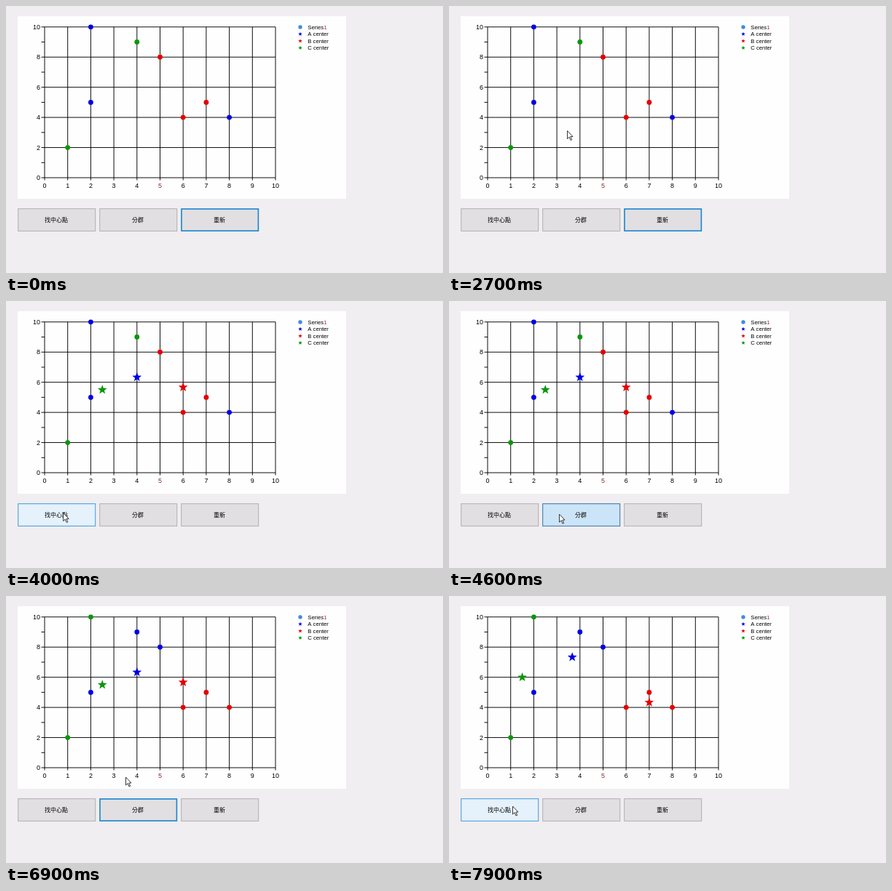
Recreate the animation shown at these times as an HTML page with a canvas. Size 600x367 px, loop 8 s.

```html
<!DOCTYPE html>
<html lang="zh-Hant">
<head>
<meta charset="utf-8">
<title>K-means</title>
<style>
html, body { margin: 0; height: 100%; overflow: hidden; background: #f0eef0; }
canvas { display: block; }
</style>
</head>
<body>
<canvas id="stage" width="600" height="367"></canvas>
<script>
const ctx = document.getElementById('stage').getContext('2d');
const LOOP = 8000, STEP = 100;
const A = '#0000e6', B = '#e60000', C = '#0a960a', BLACK = '#000';
const SANS = '"Liberation Sans", Arial, sans-serif';
const CJK = '500 8px "Noto Sans CJK TC", "Noto Sans CJK", sans-serif';

const points = [[2, 10], [2, 5], [8, 4], [5, 8], [7, 5], [6, 4], [1, 2], [4, 9]];

// Timelines: [start time, value], each held until the next entry
const clusters = [
  [0, [A, A, A, B, B, B, C, C]],
  [4700, points.map(() => BLACK)],
  [6000, [C, A, B, A, B, B, C, A]]
];
const centers = [
  [0, []],
  [3500, [[4, 19 / 3, A], [6, 17 / 3, B], [2.5, 5.5, C]]],
  [7700, [[11 / 3, 22 / 3, A], [7, 13 / 3, B], [1.5, 6, C]]]
];
const buttons = [
  { x: 16, label: '找中心點', states: [[0, 'normal'], [2900, 'hover'], [3300, 'pressed'], [3500, 'hover'],
    [4200, 'focus'], [4500, 'normal'], [7300, 'hover'], [7500, 'pressed'], [7700, 'hover']] },
  { x: 128, label: '分群', states: [[0, 'normal'], [4300, 'hover'], [4500, 'pressed'],
    [4700, 'focus'], [7500, 'normal']] },
  { x: 240, label: '重新', states: [[0, 'focus'], [3300, 'normal']] }
];
// Fill, border colour, border width
const styles = {
  normal: ['#e1dfe1', '#b3b1b3', 1],
  hover: ['#e5f1fb', '#3f9bdb', 1],
  pressed: ['#cce4f7', '#3873a8', 1],
  focus: ['#e1dfe1', '#1a86d2', 1.6]
};

// Pointer path: [time, x, y]
const path = [
  [1700, 543, 180], [1800, 270, 57], [1900, 265, 55], [2000, 262, 54], [2300, 262, 54],
  [3100, 62, 289], [3200, 60, 291], [3900, 60, 291], [4400, 151, 293], [4900, 151, 293],
  [5200, 445, 317], [5300, 471, 312], [5500, 467, 294], [6300, 467, 294],
  [6900, 164, 249], [7200, 99, 274], [7400, 87, 289], [8000, 87, 289]
];
const cursor = new Path2D('M0 0V11L2.6 8.6L4.5 13L6.2 12.3L4.3 8H7.5Z');

const px = v => 53 + 31.7 * v;
const py = v => 236 - 20.72 * v;
const valueAt = (timeline, t) => timeline.filter(entry => entry[0] <= t).pop()[1];

function line(x1, y1, x2, y2) {
  ctx.beginPath();
  ctx.moveTo(x1, y1);
  ctx.lineTo(x2, y2);
  ctx.stroke();
}

function text(str, x, y, font, align, color = '#000') {
  ctx.font = font;
  ctx.textAlign = align;
  ctx.fillStyle = color;
  ctx.fillText(str, x, y);
}

function dot(x, y, r, color) {
  ctx.fillStyle = color;
  ctx.beginPath();
  ctx.arc(x, y, r, 0, 2 * Math.PI);
  ctx.fill();
}

function star(x, y, r, color) {
  ctx.fillStyle = color;
  ctx.beginPath();
  for (let i = 0; i < 10; i++) {
    const angle = (i / 5 - 0.5) * Math.PI, radius = i % 2 ? r * 0.42 : r;
    ctx.lineTo(x + radius * Math.cos(angle), y + radius * Math.sin(angle));
  }
  ctx.fill();
}

function drawAxes() {
  const font = '9px ' + SANS;
  ctx.fillStyle = '#fffeff';
  ctx.fillRect(16, 14, 451, 251);
  ctx.strokeStyle = '#000';
  ctx.lineWidth = 0.95;
  for (let v = 0; v <= 10; v++) {
    const x = px(v), y = py(v), major = v % 2 === 0;
    line(x, py(10), x, 239.5);
    line(48.5, y, major ? px(10) : px(0), y);
    text(v, x, 249.5, font, 'center', v === 5 ? '#7d2a2a' : '#000');
    if (major) text(v, 47, y + 3, font, 'right');
  }
}

function drawLegend() {
  const font = '7.7px ' + SANS;
  dot(404, 29, 2.7, '#418cdc');
  text('Series', 414.3, 32, font, 'left');
  text('1', 436.3, 32, font, 'left', '#a03030');
  [['A', A], ['B', B], ['C', C]].forEach(([name, color], i) => {
    const y = 38.6 + 9.5 * i;
    star(404, y, 2.9, color);
    text(name + ' center', 414.3, y + 2.8, font, 'left');
  });
}

function drawButton({ x, label, states }, t) {
  const [fill, border, width] = styles[valueAt(states, t)];
  const left = x + 0.2, top = 278.2;
  ctx.fillStyle = fill;
  ctx.fillRect(left, top, 107, 31.6);
  ctx.strokeStyle = border;
  ctx.lineWidth = width;
  ctx.strokeRect(left + width / 2, top + width / 2, 107 - width, 31.6 - width);
  text(label, x + 53, 297, CJK, 'center');
}

function drawPointer(t) {
  const i = path.findIndex(key => key[0] > t);
  if (i < 1) return;
  const [t0, x0, y0] = path[i - 1], [t1, x1, y1] = path[i];
  const k = (t - t0) / (t1 - t0);
  ctx.save();
  ctx.translate(x0 + (x1 - x0) * k + 0.5, y0 + (y1 - y0) * k);
  ctx.fillStyle = '#fff';
  ctx.strokeStyle = '#222';
  ctx.lineWidth = 0.9;
  ctx.fill(cursor);
  ctx.stroke(cursor);
  ctx.restore();
}

function draw(t) {
  ctx.fillStyle = '#f0eef0';
  ctx.fillRect(0, 0, 600, 367);
  drawAxes();
  drawLegend();
  const colors = valueAt(clusters, t);
  points.forEach(([x, y], i) => dot(px(x), py(y), 3.4, colors[i]));
  for (const [x, y, color] of valueAt(centers, t)) star(px(x), py(y), 6.7, color);
  for (const button of buttons) drawButton(button, t);
  drawPointer(t);
}

const start = performance.now();
function tick() {
  const t = (performance.now() - start) % LOOP;
  draw(Math.floor(t / STEP) * STEP);
  requestAnimationFrame(tick);
}
tick();
</script>
</body>
</html>
```
